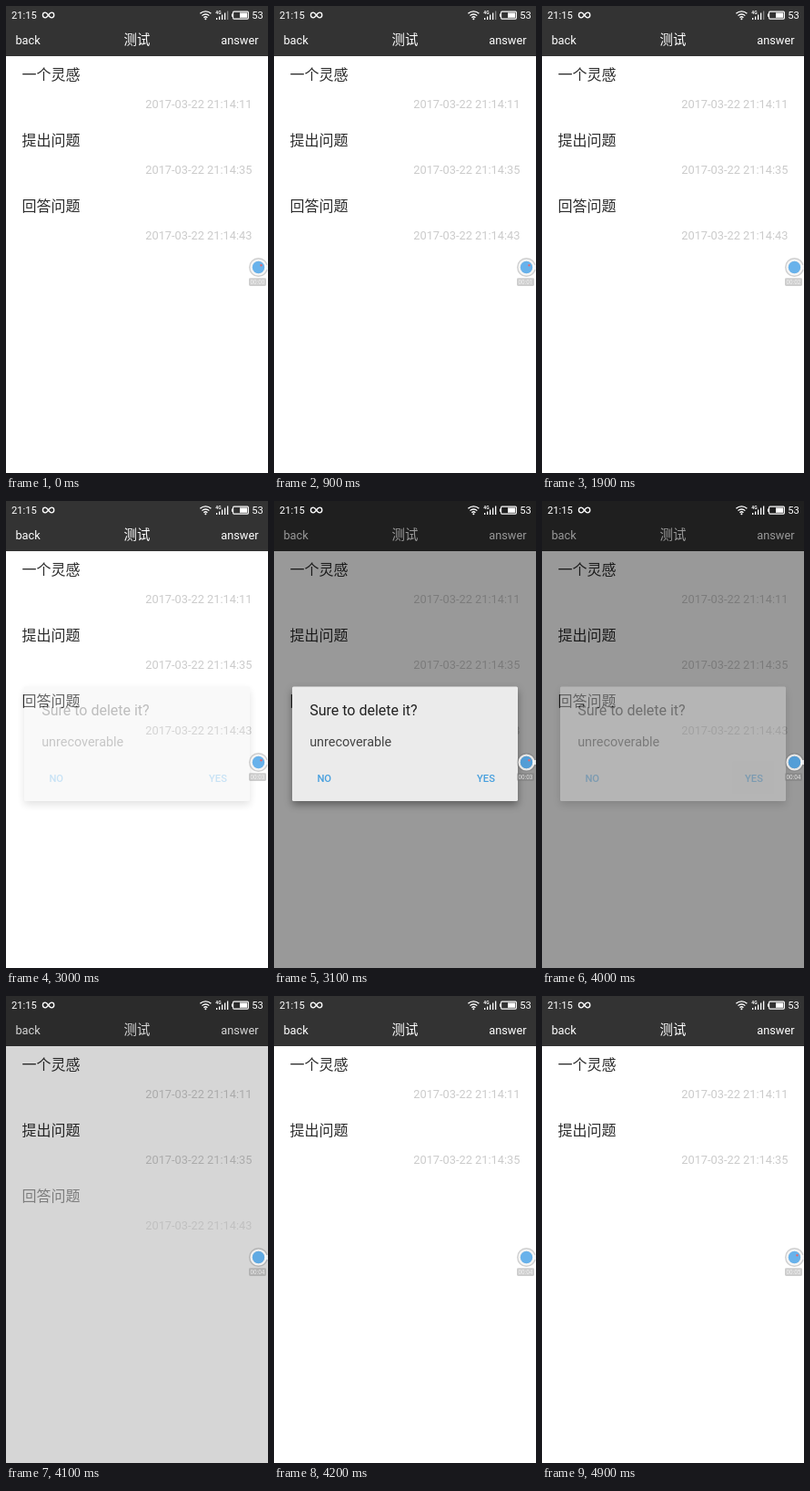
Animation, 288 px wide and 512 px high, one loop 5000 ms. Source, as an HTML page:

```html
<!DOCTYPE html>
<html lang="zh-CN">
<head>
<meta charset="utf-8">
<title>Delete a list item</title>
<style>
  html, body { margin: 0; width: 100%; height: 100%; overflow: hidden; background: #fff; }
  svg { display: block; width: 288px; height: 512px; font: 12.8px Roboto, "Noto Sans CJK SC", "Noto Sans CJK", sans-serif; }

  .bar { fill: #fff; }
  .title { font: 14.4px "Noto Sans CJK SC", "Noto Sans CJK", sans-serif; text-anchor: middle; }
  .item { font: 300 16px "Noto Sans CJK SC", "Noto Sans CJK", sans-serif; fill: #2b2b2b; }
  .date { fill: #cbcbcb; text-anchor: end; }
  .status { fill: #fff; font-size: 11.2px; }
  .line { fill: none; stroke: #fff; }
  .heading { font-size: 16px; fill: #222; }
  .message { font-size: 14.4px; fill: #444; }
  .button { font-size: 11.2px; font-weight: 500; fill: #469fde; }
  .box { fill: #ebebeb; filter: drop-shadow(0 4px 4px rgba(0, 0, 0, .38)); }
  .clock text { font-size: 6.4px; fill: #fff; fill-opacity: .75; text-anchor: middle; }

  .dim, .dialog, .row3, .press, .dot, .bar5, .strip { animation: 5s step-end infinite; }
  .dim { animation-name: dim; }
  .dialog { animation-name: dialog; }
  .row3 { animation-name: row3; }
  .press { animation-name: press; }
  .dot { animation-name: dot; }
  .bar5 { animation-name: bar5; }
  .strip { animation-name: strip; }

  @keyframes dim {
    0% { opacity: 0; } 62% { opacity: .4; } 64% { opacity: .6; }
    80% { opacity: .4; } 82% { opacity: .16; } 84%, 100% { opacity: 0; }
  }
  @keyframes dialog {
    0% { opacity: 0; } 60% { opacity: .3; } 62% { opacity: 1; }
    80% { opacity: .35; } 82%, 100% { opacity: 0; }
  }
  @keyframes row3 {
    0% { opacity: 1; } 82% { opacity: .5; } 84%, 100% { opacity: 0; }
  }
  @keyframes press {
    0% { opacity: 0; } 78% { opacity: 1; } 82%, 100% { opacity: 0; }
  }
  @keyframes dot {
    0% { opacity: 1; } 20% { opacity: 0; } 44% { opacity: 1; }
    68% { opacity: 0; } 92%, 100% { opacity: 1; }
  }
  @keyframes bar5 {
    0% { opacity: .4; } 56%, 100% { opacity: 1; }
  }
  @keyframes strip {
    0% { transform: translateY(0); }
    18% { transform: translateY(-12px); }
    38% { transform: translateY(-24px); }
    58% { transform: translateY(-36px); }
    78% { transform: translateY(-48px); }
    98%, 100% { transform: translateY(-60px); }
  }
</style>
</head>
<body>
<svg viewBox="0 0 288 512">
  <defs>
    <clipPath id="pill"><rect x="267" y="298" width="20" height="9"/></clipPath>
  </defs>

  <rect width="288" height="512" fill="#fff"/>
  <rect width="288" height="55" fill="#333"/>
  <g class="bar">
    <text x="10.4" y="42">back</text>
    <text class="title" x="144" y="41.5">测试</text>
    <text x="277.6" y="42" text-anchor="end">answer</text>
  </g>

  <g>
    <text class="item" x="17.6" y="81">一个灵感</text>
    <text class="date" x="270.4" y="111.5">2017-03-22 21:14:11</text>
  </g>
  <g transform="translate(0 72)">
    <text class="item" x="17.6" y="81">提出问题</text>
    <text class="date" x="270.4" y="111.5">2017-03-22 21:14:35</text>
  </g>
  <g transform="translate(0 144)">
    <g class="row3">
      <text class="item" x="17.6" y="81">回答问题</text>
      <text class="date" x="270.4" y="111.5">2017-03-22 21:14:43</text>
    </g>
  </g>

  <rect class="dim" width="288" height="512"/>

  <g class="dialog">
    <rect class="box" x="20" y="203.5" width="248" height="125.5" rx="1.6"/>
    <rect class="press" x="209" y="285" width="46" height="36" rx="1.6" fill="#e8e8e8"/>
    <text class="heading" x="39.2" y="235">Sure to delete it?</text>
    <text class="message" x="39.2" y="269">unrecoverable</text>
    <text class="button" x="47.4" y="307.5">NO</text>
    <text class="button" x="223" y="307.5">YES</text>
  </g>

  <!-- status bar -->
  <g class="status">
    <text x="6" y="14.3">21:15</text>
    <path class="line" stroke-width="1.3" d="M46.6 10C45 7.8 44.3 7.2 43.2 7.2a2.8 2.8 0 0 0 0 5.6C44.3 12.8 45 12.2 46.6 10S48.9 7.2 50 7.2a2.8 2.8 0 0 1 0 5.6C48.9 12.8 48.2 12.2 46.6 10Z"/>
    <path class="line" stroke-width="1.3" d="M213.4 8.3a8.6 8.6 0 0 1 12 0M215.5 10.6a5.6 5.6 0 0 1 7.8 0M217.4 12.7a2.9 2.9 0 0 1 4 0"/>
    <circle cx="219.4" cy="14.2" r="1"/>
    <text x="230.3" y="9" font-size="5" font-weight="700">4G</text>
    <path d="M231 13h1.3v2h-1.3zM234 11.5h1.3v3.5h-1.3zM237 9.5h1.3v5.5h-1.3zM240 7.5h1.3v7.5h-1.3z"/>
    <rect class="bar5" x="243" y="5.5" width="1.3" height="9.5"/>
    <rect class="line" x="249.6" y="6.1" width="16.8" height="8" rx="1" stroke-width="1.1"/>
    <rect x="248" y="8.5" width="1.2" height="3.2"/>
    <rect x="257" y="7.4" width="8.2" height="5.4"/>
    <text x="270.3" y="14.3">53</text>
  </g>

  <!-- floating recorder -->
  <g>
    <circle cx="277.5" cy="286.5" r="10.5" fill="#6e6e6e" fill-opacity=".33"/>
    <rect x="284.5" y="284" width="3.5" height="5" fill="#fff" fill-opacity=".75"/>
    <circle cx="277.5" cy="286.5" r="7.9" fill="none" stroke="#fff" stroke-width="2.4" stroke-opacity=".8"/>
    <circle cx="277.5" cy="286.5" r="6.7" fill="#3da6f8" fill-opacity=".7"/>
    <circle class="dot" cx="280.5" cy="284.3" r="1.2" fill="#e06a72"/>
    <rect x="267" y="298.3" width="19" height="8.6" rx="1.4" fill="#6e6e6e" fill-opacity=".34"/>
    <g class="clock" clip-path="url(#pill)">
      <g class="strip">
        <text x="276.5" y="305">00:00</text>
        <text x="276.5" y="317">00:01</text>
        <text x="276.5" y="329">00:02</text>
        <text x="276.5" y="341">00:03</text>
        <text x="276.5" y="353">00:04</text>
        <text x="276.5" y="365">00:05</text>
      </g>
    </g>
  </g>
</svg>
</body>
</html>
```
